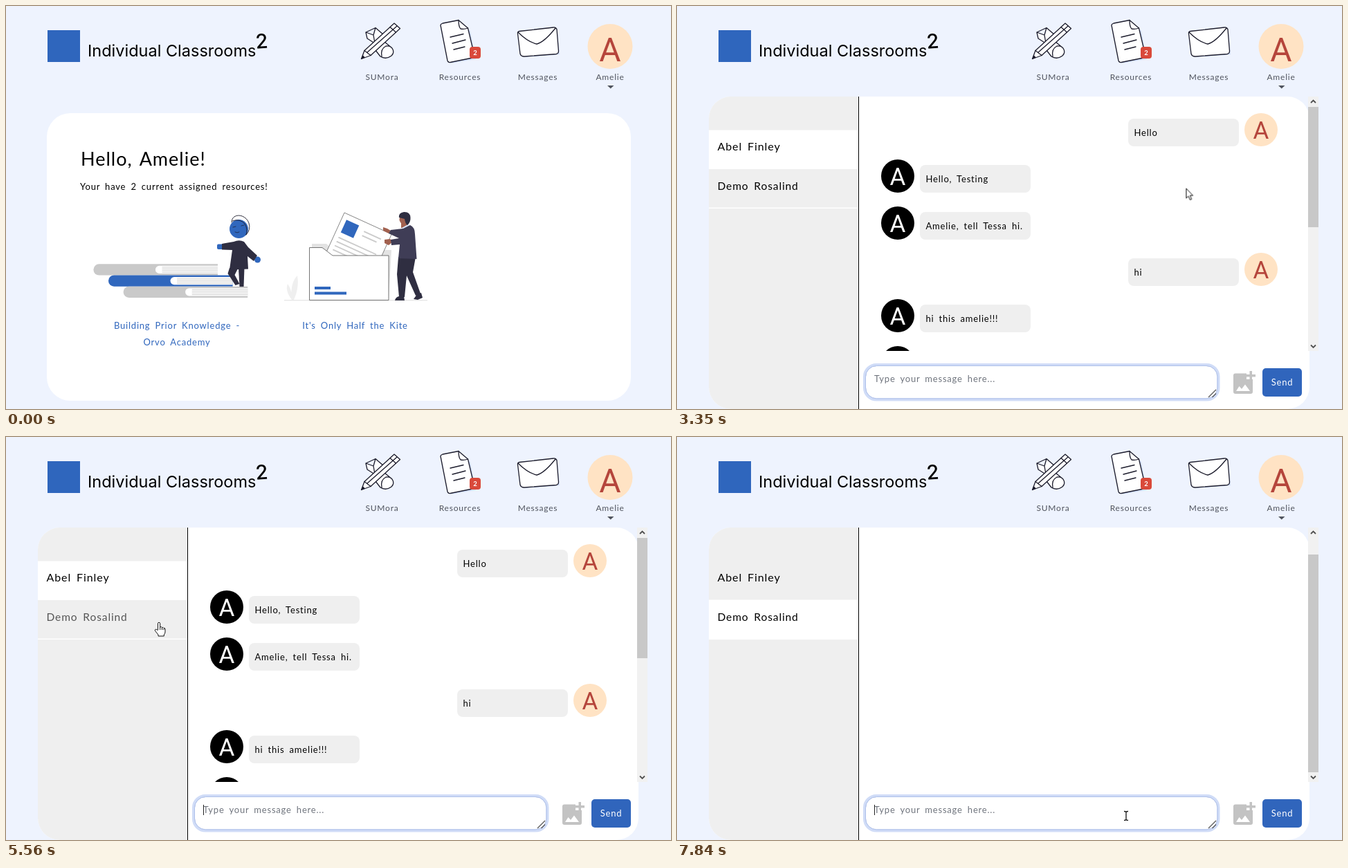
An HTML page that plays this animation: 961x583 px, repeating every 8 s.

```html
<!DOCTYPE html>
<html lang="en">
<head>
<meta charset="utf-8">
<title>Messages</title>
<style>
@property --scroll { syntax: "<number>"; inherits: true; initial-value: 0; }
html, body { margin: 0; width: 100%; height: 100%; overflow: hidden; background: #eef3fe; }
svg { display: block; }
text { font: 13px Lato, sans-serif; letter-spacing: .8px; word-spacing: 3px; white-space: pre; }
.mid { text-anchor: middle; }
.label { font-size: 12px; fill: #50545e; }
.link { fill: #2f66bd; }
.name { font-size: 16px; letter-spacing: .9px; }
.initial { font: 35px Roboto, sans-serif; letter-spacing: 0; text-anchor: middle; }
.brand { font: 23.5px Inter, sans-serif; letter-spacing: 0; word-spacing: 0; }
.ink { fill: none; stroke: #1c1c2c; stroke-width: 1.3; stroke-linecap: round; stroke-linejoin: round; }
.paper { fill: #fff; }

/* One loop is 8000 ms: 1% = 80 ms */
.home, .chat, .msgs, .bar2, .row1, .row2, .ring, .caret, .shade, .cursor, .arrow, .hand, .beam, .hot, .hotname {
  animation: 8s step-end infinite; }
.home { animation-name: home; }
.chat { animation-name: chat, scroll; animation-duration: 8s; animation-timing-function: step-end, linear; }
.msgs { animation-name: msgs; }
.bar2 { animation-name: bar2; }
.row1 { animation-name: row1; }
.row2 { animation-name: row2; }
.caret { animation-name: caret; }
.arrow { animation-name: arrow; }
.hand { animation-name: hand; }
.beam { animation-name: beam; }
.ring { animation-name: ring; animation-timing-function: linear; }
.shade { animation-name: shade; animation-timing-function: linear; }
.hot { animation-name: hot; animation-timing-function: linear; }
.hotname { animation-name: hotname; animation-timing-function: linear; }
.cursor { animation-name: move; animation-timing-function: ease-in-out; }
.list { transform: translateY(calc(var(--scroll) * -1px)); }
.thumb { transform: translateY(calc(var(--scroll) * .54px)); }

@keyframes home { 0% { opacity: 1 } 30.2%, 100% { opacity: 0 } }
@keyframes chat { 0% { opacity: 0 } 30.2%, 100% { opacity: 1 } }
@keyframes msgs { 0% { opacity: 0 } 30.8% { opacity: 1 } 75.19%, 100% { opacity: 0 } }
@keyframes bar2 { 0% { opacity: 0 } 75.8%, 100% { opacity: 1 } }
@keyframes row1 { 0% { opacity: 1 } 75.19%, 100% { opacity: 0 } }
@keyframes row2 { 0% { opacity: 0 } 75.19%, 100% { opacity: 1 } }
@keyframes scroll {
  0%, 47.6% { --scroll: 0 }
  49.9%, 50.5% { --scroll: 232 }
  52%, 55% { --scroll: 306 }
  58.3%, 58.9% { --scroll: 83 }
  60.6%, 100% { --scroll: 0 }
}
@keyframes shade {
  0%, 30.19% { opacity: 0 } 30.2%, 30.8% { opacity: 1 } 31.4%, 75.18% { opacity: 0 }
  75.19%, 75.85% { opacity: 1 } 76.4%, 100% { opacity: 0 }
}
@keyframes ring {
  0%, 31.7% { opacity: 0 } 33.7%, 72% { opacity: 1 }
  73.4%, 76.4% { opacity: 0 } 77.7%, 100% { opacity: 1 }
}
@keyframes caret {
  0%, 37.25%, 49.75%, 62.125%, 72%, 82.125%, 94.625% { opacity: 0 }
  30.875%, 43.375%, 55.875%, 68.375%, 75.875%, 88.375%, 97.375%, 100% { opacity: 1 }
}
@keyframes hot {
  0%, 8.4% { fill: #50545e } 9.8%, 30.19% { fill: #7f8490 } 30.2%, 37.2% { fill: #50545e }
  38%, 39.5% { fill: #7f8490 } 41%, 100% { fill: #50545e }
}
@keyframes hotname { 0%, 66.8% { fill: #000 } 67.8%, 72% { fill: #555 } 73.4%, 100% { fill: #000 } }
@keyframes move {
  0%, .6% { transform: translate(704px, 254px) }
  10.4%, 11.6% { transform: translate(748px, 80px) }
  13.5% { transform: translate(750px, 79px) }
  16.9%, 37% { transform: translate(763px, 67px) }
  46.6%, 60% { transform: translate(709.5px, 448px) }
  68.1%, 81.9% { transform: translate(221px, 268px) }
  92.1%, 92.6% { transform: translate(754px, 494px) }
  97.4%, 100% { transform: translate(649px, 548px) }
}
@keyframes arrow {
  0%, 8.6%, 67.2%, 76.4%, 95.4%, 100% { opacity: 0 }
  .6%, 40%, 75.19%, 84% { opacity: 1 }
}
@keyframes hand {
  0%, 40%, 75.19%, 84%, 100% { opacity: 0 }
  8.6%, 67.2%, 76.4% { opacity: 1 }
}
@keyframes beam { 0% { opacity: 0 } 95.4%, 100% { opacity: 1 } }
</style>
</head>
<body>
<svg width="961" height="583" viewBox="0 0 961 583">
  <defs>
    <clipPath id="card"><rect x="46" y="131" width="868" height="452" rx="32"/></clipPath>
    <clipPath id="view"><rect x="263" y="131" width="649" height="368"/></clipPath>
    <g id="track">
      <rect x="912" y="131" width="15" height="368" fill="#f1f1f1"/>
      <path d="M916 140l3.5-3.5 3.5 3.5M916 490.5l3.5 3.5 3.5-3.5" fill="none" stroke="#505050" stroke-width="1.8"/>
    </g>
  </defs>
  <rect width="961" height="583" fill="#eef3fe"/>

  <g id="header">
    <rect x="60" y="35" width="47" height="46" fill="#2f66bd"/>
    <text class="brand" x="118" y="72.5">Individual Classrooms</text>
    <text class="brand" x="360.5" y="61" style="font-size:29px;font-weight:500" transform="rotate(-4 370 50)">2</text>

    <g class="ink">
      <path class="paper" d="M520 38L534 31.5L546 42L533 54L522 47ZM520 38L531 42L534 31.5M531 42L533 54"/>
      <path class="paper" d="M534 64L546 51L558 61Q562 67 557 72Q549 78 541 73ZM543 73Q541 62 549 58Q557 57 559 63"/>
      <path class="paper" d="M513.5 76.5L518 64.5L561 25L569.5 32.5L527 71.5Z"/>
      <path d="M518 64.5L527 71.5M522 67L565 29M555 30.5L563.5 38"/>
    </g>
    <path d="M513 77l2.5-6 3.5 3.5z" fill="#1c1c2c"/>

    <path d="M632 30l25-6 14 12 8 41-36 6z" fill="#d3e0fa"/>
    <g class="ink">
      <path class="paper" d="M628 28Q628 26 631 25L654 20.5L667.5 32L677 72Q677 74 674 75L642 81.5Q639 82 638 79Z"/>
      <path d="M654 20.5Q654 30 657 33Q662 34 667.5 32M642 45L661 40.5M645 54L664 49M647 63L663 59"/>
    </g>
    <rect x="670" y="59" width="16" height="17" rx="4" fill="#d9493a"/>
    <text class="mid" x="678.3" y="71" fill="#fff" style="font-size:9.5px;font-weight:700">2</text>

    <path d="M744 41l52-5 4 34-48 4z" fill="#d3e0fa"/>
    <g class="ink">
      <path class="paper" d="M739.5 40Q739 37 742 36.5L791 31Q795 30.5 796 34L798.5 65Q798.5 69 795 69.5L749 73Q744 73 743 69Z"/>
      <path d="M740 38C749 47 758 53 767 55C775 53 786 42 794 32"/>
    </g>

    <text class="label mid" x="543.5" y="107">SUMora</text>
    <text class="label mid" x="656" y="107">Resources</text>
    <text class="label mid hot" x="768.5" y="107">Messages</text>
    <circle cx="873" cy="58.5" r="32.5" fill="#ffe3c4"/>
    <text class="initial" x="873" y="80" fill="#b5453b" style="font-size:48px">A</text>
    <text class="label mid" x="873" y="107">Amelie</text>
    <path d="M869 115h9.5l-4.75 4.5z" fill="#50545e"/>
  </g>

  <g class="home">
    <rect x="59" y="155" width="844" height="416" rx="34" fill="#fff"/>
    <text x="108" y="231" style="font-size:27px;letter-spacing:1px">Hello, Amelie!</text>
    <text x="107" y="266">Your have 2 current assigned resources!</text>
    <text class="link mid" x="247" y="467">Building Prior Knowledge -</text>
    <text class="link mid" x="247" y="491">Orvo Academy</text>
    <text class="link mid" x="504.5" y="467">It's Only Half the Kite</text>

    <g id="books"></g>
    <g fill="#2f2e41">
      <circle cx="336.5" cy="322.5" r="13.5" fill="#3067bd"/>
      <path class="ink" style="stroke-width:.9" d="M326 313C326 299 346 300 351 314Q354 324 347 331M327 311Q338 307 345 315Q350 323 347 331"/>
      <path class="ink" style="stroke-width:.7" d="M328 320l4-1M340 318l4-1M331 327q3 2 6 0"/>
      <circle cx="363.5" cy="367" r="4.5" fill="#3067bd"/>
      <rect x="305" y="344.5" width="9" height="7.5" rx="2" fill="#3067bd"/>
      <path d="M329 341Q337 337.500 344 341L350 349L363 361L358 369L349 362L350 380.500L323 381.500L327 353L312 352.500V344Z"/>
      <path d="M336 379h8.5l-1 27h-6z"/>
      <path d="M323 379l-2.5 8 11 17 6-2-7-13 5-10z"/>
    </g>

    <path d="M402 425.8H609" stroke="#ddd"/>
    <path d="M413 425Q403 412 407 402Q413 410 414 425ZM413 425Q410 401 421 390Q424 408 416 425Z" fill="#efefef"/>
    <path d="M442 352v-8h21l10 9h84l-4 72h-111z" fill="#e3e3e3"/>
    <g transform="translate(489 299) rotate(24.5)">
      <path d="M0 0H75V70H0Z" fill="#fff" stroke="#777" stroke-width=".8"/>
      <rect x="7" y="8" width="20" height="20" fill="#3067bd"/>
      <path d="M37 13H64M37 19.5H60M7 36H67M7 42.5H67M7 49H67M7 55.5H67" stroke="#cbcbcb" stroke-width="1.8"/>
    </g>
    <path d="M438.5 349.5H457L472 361H553V425.5H438.5Z" fill="#fff" stroke="#666" stroke-width=".9"/>
    <path d="M446 408H469M446 415.5H492" stroke="#3067bd" stroke-width="4"/>

    <g fill="#2f2e41">
      <path d="M567 363H592L588 385L599 416L592 419L579 390L576 421H568L565 388Z"/>
      <path d="M562 426q1-5 6-6h7l1 6zM589 424l5-7 6-2 2 7-7 3z"/>
      <path d="M545 320l6 2 5 3-3 4-8-4zM547 338l8-1 4 4-6 5-6-3z" fill="#a2614f"/>
      <path d="M571 311h10v10h-10z" fill="#a2614f"/>
      <path d="M572 321l9-5 5 3-11 10z" fill="#d6e3f7"/>
      <path d="M574 322L584 317Q591 320 591 330L593.5 366L567 365L569 345L557 346L556 338L568 336L553 329L556 324Z" fill="#3f3d56"/>
      <circle cx="575" cy="309" r="6.5" fill="#a2614f"/>
      <path d="M568 306Q567 299 575 298Q584 297.5 584.5 306Q585 313 580 317Q577 315 576 308Z"/>
    </g>
  </g>

  <g class="chat">
    <g clip-path="url(#card)">
      <rect x="46" y="131" width="868" height="452" fill="#fff"/>
      <rect x="46" y="131" width="216" height="452" fill="#efefef"/>
      <g class="row1" fill="#fff">
        <rect x="46" y="179.5" width="216" height="56.5"/>
        <rect x="46" y="291.5" width="216" height="1.5"/>
      </g>
      <rect class="row2" x="46" y="235.5" width="216" height="57.5" fill="#fff"/>
    </g>
    <path d="M262.5 131V583" stroke="#000"/>
    <text class="name" x="58.5" y="209">Abel Finley</text>
    <text class="name hotname" x="58.5" y="265.5" style="font-size:15.5px">Demo Rosalind</text>

    <g class="msgs">
      <g clip-path="url(#view)"><g class="list" id="list"></g></g>
      <use href="#track"/>
      <rect class="thumb" x="912" y="146" width="15" height="174" fill="#c8c8c8"/>
    </g>
    <g class="bar2">
      <use href="#track"/>
      <rect x="912" y="170" width="15" height="315" fill="#c8c8c8"/>
    </g>

    <rect x="272.5" y="520.5" width="508.5" height="47.5" rx="16" fill="#fff" stroke="#cfcfe2"/>
    <g class="ring" fill="none">
      <rect x="271" y="519" width="511.5" height="50.5" rx="17" stroke="#d0dcf7" stroke-width="4"/>
      <rect x="272.5" y="520.5" width="508.5" height="47.5" rx="16" stroke="#adc0ea"/>
    </g>
    <text x="285" y="544" fill="#6f747d">Type your message here...</text>
    <path class="caret" d="M285.5 532V547" stroke="#222"/>
    <path d="M768 566L779 555M773.5 566L779 560.5" stroke="#555" stroke-width="1.2"/>
    <g fill="#c3c3c3">
      <path fill-rule="evenodd" d="M807 531.5H823V540H832V558Q832 561 829 561H807Q804 561 804 558V534.5Q804 531.5 807 531.5ZM808 557H828L821 547.5L816 554L812.5 550Z"/>
      <path d="M827.5 528h3.5v5h5v3.5h-5v5h-3.5v-5h-5v-3.5h5z"/>
    </g>
    <rect x="846" y="524" width="57" height="41" rx="5" fill="#3065bc"/>
    <text class="mid" x="874.5" y="548.5" fill="#fff">Send</text>
  </g>

  <g class="shade">
    <rect width="961" height="583" fill="rgb(202 196 205 / .7)"/>
    <rect x="432.5" y="276" width="96" height="129.5" rx="3" fill="#fff" stroke="#d0ccd4" stroke-width=".8"/>
    <g id="spinner" stroke-width="4.2"></g>
  </g>

  <g class="cursor" stroke="#111" stroke-linejoin="round">
    <path class="arrow" d="M.5 .5V14.5L3.7 11.6L6 17L8.3 16L6 10.7H10.2Z" fill="#fff"/>
    <path class="hand" d="M-1.5 11V1.8Q-1.5 .3 0 .3Q1.7 .3 1.7 1.8V7Q3.3 5.8 4.5 7.6Q6.2 6.7 7 8.4Q9 8 9 10V14Q9 16.5 7.3 18V20H-1V18L-5.6 12.3Q-6.2 10.5-4.3 10.2Q-2.8 10.2-1.5 12M1.7 7V11M4.5 8V11M7 9V11" fill="#fff"/>
    <path class="beam" d="M-3-6.5Q0-6.5 0-5Q0-6.5 3-6.5M0-5.5V5.5M-3 6.5Q0 6.5 0 5Q0 6.5 3 6.5" fill="none" stroke-width="1.3"/>
  </g>
</svg>
<script>
const fill = (id, parts) => { document.getElementById(id).innerHTML = parts.join(""); };

// side, bubble top, left edge, width, text
const messages = [
  ["R", 163, 652, 160, "Hello"],
  ["L", 230, 351, 160, "Hello, Testing"],
  ["L", 298, 351, 160, "Amelie, tell Tessa hi."],
  ["R", 365, 652, 160, "hi"],
  ["L", 432, 351, 160, "hi this amelie!!!"],
  ["L", 500, 351, 253, "that's wrong. this is abel to amelie"],
  ["R", 567.5, 649, 163, "Hi abel, this is ameile"],
  ["R", 635, 652, 160, "from ameliee"],
];

function avatar(side, y) {
  const [x, disc, ink] = side === "R" ? [844, "#ffe3c4", "#b5453b"] : [319, "#000", "#fff"];
  return `<circle cx="${x}" cy="${y}" r="24" fill="${disc}"/>
    <text class="initial" x="${x}" y="${y + 13}" fill="${ink}">A</text>`;
}

function bubble(x, y, w, h, text, style = "") {
  return `<rect x="${x}" y="${y}" width="${w}" height="${h}" rx="8" fill="#efefef"/>
    <text x="${x + 8.5}" y="${y + 25}" style="${style}">${text}</text>`;
}

fill("list", [
  ...messages.map(([side, y, x, w, text]) => avatar(side, y + 16) + bubble(x, y, w, 40, text)),
  avatar("R", 734),
  bubble(508, 694, 304, 88, "Download attached file:", "text-decoration:underline"),
]);

fill("books", ["#c9c9c9", "#3067bd", "#c9c9c9"].map((color, i) => {
  const x = 126.5 + 21.6 * i, y = 373.3 + 16.2 * i, end = x + 179.5;
  const lines = [0, 1, 2, 3].map(n => `M${x + 99} ${y + 4.6 + n * 2.4}H${end}`).join("");
  return `<path d="M${end} ${y}H${x + 8}a8 8 0 0 0 0 16.2H${end}Z" fill="${color}"/>
    <path d="M${end} ${y + 2.5}H${x + 95}a5.6 5.6 0 0 0 0 11.2H${end}Z" fill="#fff"/>
    <path d="${lines}" stroke="#c6c6c6" stroke-width=".8"/>`;
}));

fill("spinner", Array.from({ length: 20 }, (_, i) =>
  `<path d="M481 301V287" transform="rotate(${i * 18} 481 315)"
    stroke="${i > 12 && i < 17 ? "#c8d6ec" : "#5f84c8"}"/>`));
</script>
</body>
</html>
```
